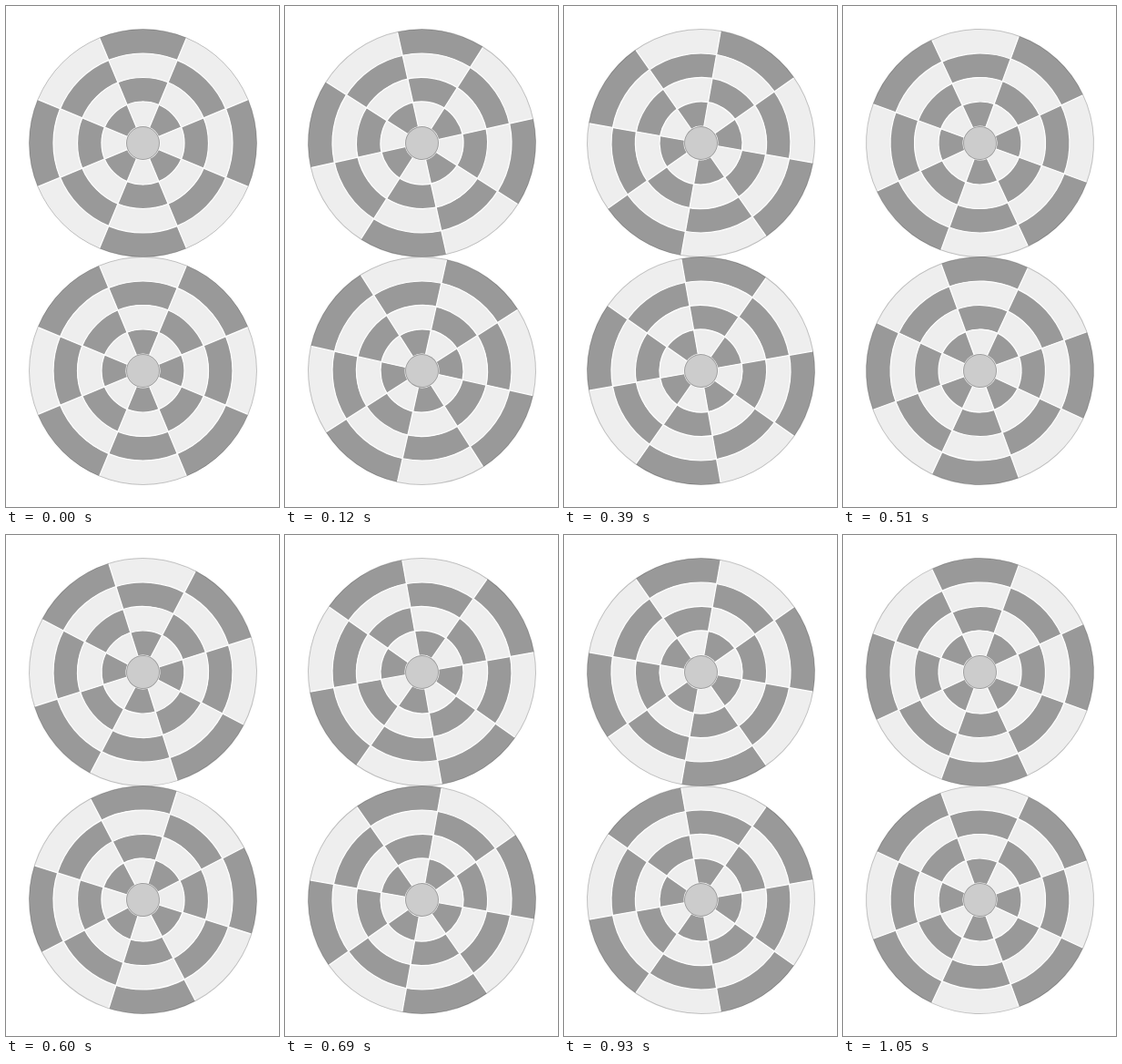
An HTML page with a canvas that plays this animation: 300 by 550 pixels, repeating every 1080 ms.

```html
<!DOCTYPE html>
<html lang="en">
<head>
<meta charset="utf-8">
<title>Counter-rotating wheels</title>
<style>
  html, body { margin: 0; width: 100%; height: 100%; overflow: hidden; background: #fff; }
  canvas { display: block; }
</style>
</head>
<body>
<canvas id="stage" width="300" height="550"></canvas>
<script>
const ctx = document.getElementById('stage').getContext('2d');
const LOOP = 1080, STEP = 30, TURN = Math.PI / 2;
const RADIUS = 125, HUB = 18, RINGS = 4, SECTORS = 8;
const RING = 26.5, SLICE = 2 * Math.PI / SECTORS;
const EDGE = 'rgba(0, 0, 0, 0.22)';

function circle(r) {
  ctx.beginPath();
  ctx.arc(0, 0, r, 0, 2 * Math.PI);
}

function cell(ring, sector, fill) {
  const outer = RADIUS - ring * RING;
  const start = (sector - 0.5) * SLICE - Math.PI / 2;
  ctx.beginPath();
  ctx.arc(0, 0, outer, start, start + SLICE);
  ctx.arc(0, 0, outer - RING, start + SLICE, start, true);
  ctx.closePath();
  ctx.fillStyle = fill;
  ctx.fill();
}

function seams() {
  ctx.strokeStyle = '#fff';
  ctx.lineWidth = 1.2;
  for (let ring = 1; ring < RINGS; ring++) {
    circle(RADIUS - ring * RING);
    ctx.stroke();
  }
  ctx.beginPath();
  for (let s = 0; s < SECTORS; s++) {
    const a = (s + 0.5) * SLICE;
    ctx.moveTo(0, 0);
    ctx.lineTo(RADIUS * Math.cos(a), RADIUS * Math.sin(a));
  }
  ctx.stroke();
}

function wheel(y, angle, parity) {
  ctx.save();
  ctx.translate(150.5, y);
  ctx.rotate(angle);
  for (let ring = 0; ring < RINGS; ring++) {
    for (let s = 0; s < SECTORS; s++) {
      cell(ring, s, (ring + s + parity) % 2 ? '#eee' : '#999');
    }
  }
  seams();
  ctx.strokeStyle = EDGE;
  ctx.lineWidth = 1;
  circle(RADIUS);
  ctx.stroke();
  circle(HUB + 0.5);
  ctx.fillStyle = '#ccc';
  ctx.fill();
  circle(HUB);
  ctx.stroke();
  ctx.restore();
}

function draw(now) {
  const t = Math.floor((now % LOOP) / STEP) * STEP;
  const angle = TURN * t / LOOP;
  ctx.fillStyle = '#fff';
  ctx.fillRect(0, 0, 300, 550);
  wheel(150.5, angle, 0);
  wheel(400.5, -angle, 1);
}

let origin = null;
function tick(now) {
  if (origin === null) origin = now;
  draw(Math.max(0, now - origin));
  requestAnimationFrame(tick);
}
draw(0);
requestAnimationFrame(tick);
</script>
</body>
</html>
```
